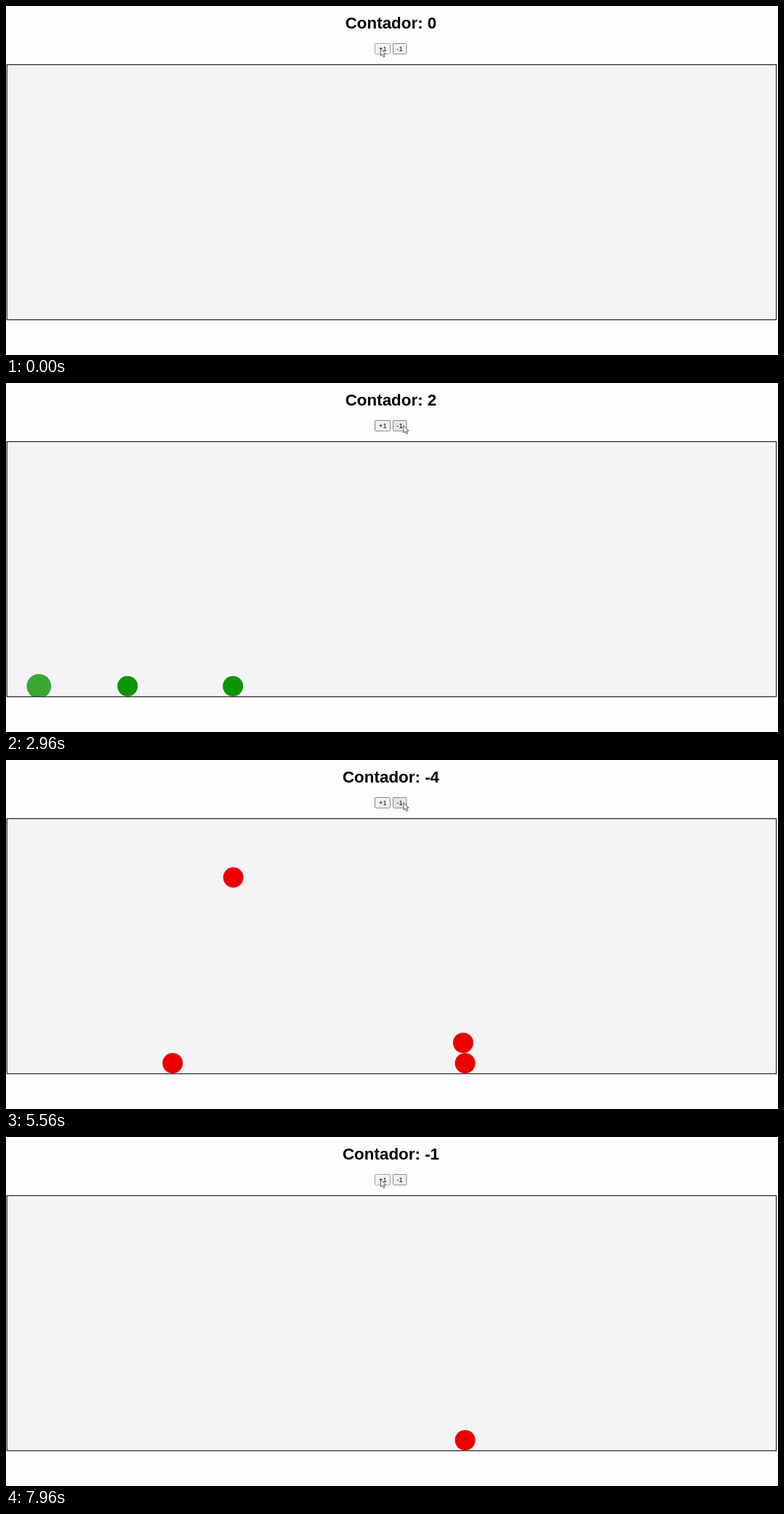
These frames come from a looping animation (1062x480 px, 8 s). An HTML page:

```html
<!DOCTYPE html>
<html lang="es">
<head>
<meta charset="utf-8">
<title>Contador</title>
<style>
  html, body { margin: 0; width: 100%; height: 100%; overflow: hidden; background: #fdfcfe; }
  svg { display: block; width: 1062px; height: 480px; }
  text { font-family: Arial, "Liberation Sans", sans-serif; text-anchor: middle; fill: #000; }
  #title { font-size: 22.4px; font-weight: bold; }
  .button rect { fill: #efefef; stroke: #85858a; stroke-width: 1; }
  .button text { font-size: 9.33px; }
  .button.hover rect { fill: #e3e3e8; }
  .button.active rect { fill: #f5f5f7; stroke: #a5a5aa; }
</style>
</head>
<body>
<svg viewBox="0 0 1062 480">
  <defs><clipPath id="inside"><rect x="2" y="81" width="1057" height="350"/></clipPath></defs>
  <text id="title" x="529.5" y="31.3"></text>
  <g class="button" id="plus">
    <rect x="507.5" y="51.5" width="21" height="14.5" rx="1.6"/>
    <text x="518.3" y="61.8">+1</text>
  </g>
  <g class="button" id="minus">
    <rect x="532.5" y="51.5" width="18.5" height="14.5" rx="1.6"/>
    <text x="541.5" y="61.8">-1</text>
  </g>
  <rect x="1.3" y="80.6" width="1058.3" height="350.9" fill="#f4f3f6" stroke="#2e2e30" stroke-width="1.3"/>
  <g id="balls" clip-path="url(#inside)"></g>
  <path id="cursor" d="M0 0V10L2.3 8L4 11.6L5.7 10.8L4.1 7.3H7.2Z" fill="#fff" stroke="#444" stroke-width=".9"/>
</svg>
<script>
const LOOP = 8000, STEP = 40;
const TOP = 95, FLOOR = 417, RADIUS = 14;
const GRAVITY = 0.0055;   // px per ms², already halved
const POP = 200;          // length of the removal, ms
const GREEN = '#0a9504', RED = '#ec0000';

// [time, change]
const clicks = [
  [35, 1], [310, 1], [590, 1], [870, 1],
  [2630, -1], [2893, -1], [3200, -1], [3500, -1],
  [4560, -1], [4937, -1], [5195, -1], [5450, -1], [5710, -1],
  [6985, 1], [7240, 1], [7495, 1], [7745, 1], [8030, 1]
];

// x, colour, dropped at, removed at, resting height
const balls = [
  [45.3, GREEN, 35, 2893], [167.2, GREEN, 310, 3200],
  [312.2, GREEN, 590, 3500], [445, GREEN, 870, 2630],
  [631.6, RED, 4560, Infinity], [229.3, RED, 4937, 7745],
  [628.9, RED, 5195, 7495, FLOOR - 2 * RADIUS],
  [312.7, RED, 5450, 6985], [509.1, RED, 5710, 7240]
].map(([x, fill, born, gone, rest = FLOOR]) => {
  const el = document.createElementNS('http://www.w3.org/2000/svg', 'circle');
  el.setAttribute('cx', x);
  el.setAttribute('fill', fill);
  document.getElementById('balls').append(el);
  return { el, born, gone, rest };
});

const title = document.getElementById('title');
const plus = document.getElementById('plus');
const minus = document.getElementById('minus');
const cursor = document.getElementById('cursor');

// 0 over the +1 button, 1 over the -1 button
function glide(t) {
  const ease = (from, to) => {
    const k = Math.min(1, Math.max(0, (t - from) / (to - from)));
    return k * k * (3 - 2 * k);
  };
  return ease(1800, 2300) - ease(6150, 6600);
}

function drawBall({ el, born, gone, rest }, t) {
  const visible = t >= born && t < gone + POP;
  el.style.display = visible ? '' : 'none';
  if (!visible) return;
  let scale = 1, opacity = 1;
  if (t >= gone) {
    const k = (t - gone) / POP * 2;
    scale = k < 1 ? 1 + 0.3 * k : 1.3 * (2 - k);
    opacity = k < 1 ? 1 - 0.3 * k : 0.7 * (2 - k);
  }
  el.setAttribute('cy', Math.min(rest, TOP + GRAVITY * (t - born) ** 2));
  el.setAttribute('r', RADIUS * scale);
  el.setAttribute('opacity', opacity);
}

function draw(t) {
  const count = clicks.reduce((sum, [at, step]) => at <= t ? sum + step : sum, 0);
  const text = 'Contador: ' + count;
  if (title.textContent !== text) title.textContent = text;

  const x = 515.3 + 31.6 * glide(t);
  cursor.setAttribute('transform', `translate(${x} 58.6)`);
  const pressed = clicks.some(([at]) => t >= at - 80 && t < at + 30);
  const style = over => 'button' + (over ? pressed ? ' active' : ' hover' : '');
  plus.setAttribute('class', style(x < 529));
  minus.setAttribute('class', style(x > 532));

  for (const ball of balls) drawBall(ball, t);
}

const start = performance.now();
function tick() {
  const t = (performance.now() - start) % LOOP;
  draw(Math.floor(t / STEP) * STEP);
  requestAnimationFrame(tick);
}
tick();
</script>
</body>
</html>
```
